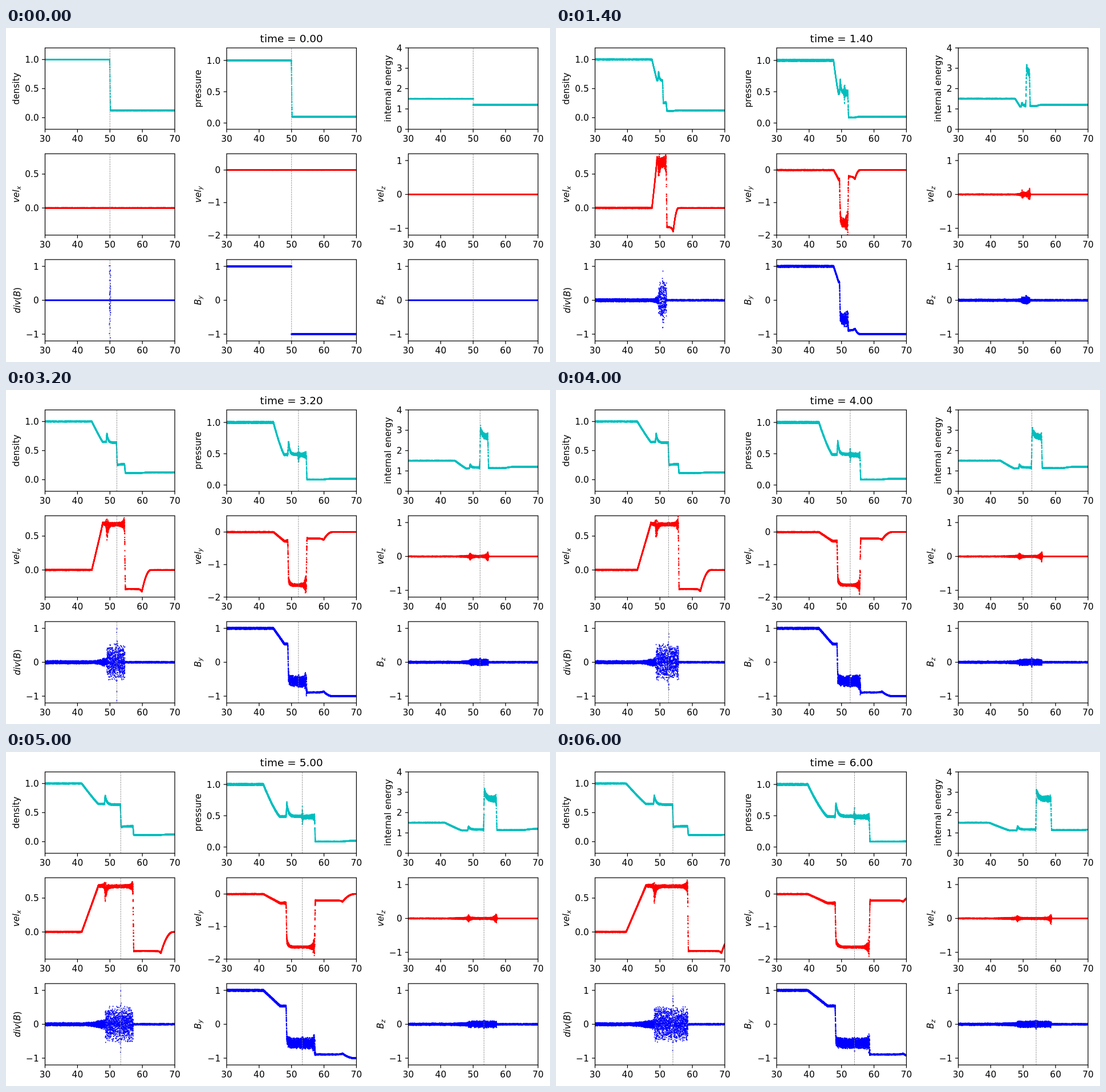
An HTML page with a canvas for the animation above (6.2 s loop, 954 by 587 pixels).

```html
<!DOCTYPE html>
<html lang="en">
<head>
<meta charset="utf-8">
<title>Shock tube</title>
<style>
html, body { margin: 0; width: 100%; height: 100%; overflow: hidden; background: #fff; }
canvas { display: block; }
</style>
</head>
<body>
<canvas id="stage" width="954" height="587"></canvas>
<script>
const ctx = document.getElementById('stage').getContext('2d');
const LOOP = 6200, STEP = 200, SAMPLES = 6000;
const W = 227.5, H = 143, COLS = [68.5, 387, 705.5], ROWS = [35, 221, 407];
const EM = 15.4, FONT = '"DejaVu Sans", Verdana, sans-serif';
const COLORS = ['#00bfbf', '#ff0000', '#0000ff'];

// l, m, p, q, r, f: plateaus from left to right, split by the waves.
// o: overshoot at the fan tail, sa/qa: decaying peaks, dp: dip, bend: fan curvature.
// n*: scatter left, in the fan, middle, behind contact, right, at spike, contact and shock.
const panels = [
  { name: 'density', lo: -0.2, hi: 1.2, ticks: [0, 0.5, 1], dec: 1, base: 23.4,
    l: 1, m: 0.648, p: 0.637, q: 0.265, r: 0.115, f: 0.125, o: -0.012, sa: 0.16, qa: -0.02, bend: 1.08, soft: 1,
    nl: 0.007, nm: 0.014, nq: 0.01, ns: 0.01, nk: 0.01 },
  { name: 'pressure', lo: -0.1, hi: 1.2, ticks: [0, 0.5, 1], dec: 1, base: 23.4,
    l: 1, m: 0.487, p: 0.492, q: 0.48, r: 0.088, f: 0.1, o: -0.022, sa: 0.21, bend: 1.28, soft: 1,
    nl: 0.016, nm: 0.02, nq: 0.035, ns: 0.03, nc: 0.2, nk: 0.04 },
  { name: 'internal energy', lo: 0, hi: 4, ticks: [0, 1, 2, 3, 4], base: 38,
    l: 1.5, m: 1.13, p: 1.17, q: 2.67, r: 1.14, f: 1.2, o: -0.03, sa: 0.14, qa: 0.48, bend: 1.1,
    nl: 0.012, nm: 0.03, nq: 0.15, ns: 0.03, nc: 0.4, nk: 0.12 },
  { name: 'vel', sub: 'x', lo: -0.4, hi: 0.8, ticks: [0, 0.5], dec: 1, base: 23.4,
    l: 0, m: 0.68, p: 0.674, q: 0.674, r: -0.28, f: 0, o: 0.06, sa: -0.1, dp: -0.03,
    nl: 0.006, ng: 0.025, nm: 0.022, ns: 0.18, nk: 0.14, gain: 2 },
  { name: 'vel', sub: 'y', lo: -2, hi: 0.5, ticks: [-2, -1, 0], base: 23.4,
    l: 0, m: -0.28, p: -1.63, q: -1.63, r: -0.2, f: 0, o: -0.02, sa: 0.2, dp: -0.035,
    nl: 0.01, ng: 0.03, nm: 0.03, ns: 0.1, nk: 0.46, gain: 3 },
  { name: 'vel', sub: 'z', lo: -1.2, hi: 1.2, ticks: [-1, 0, 1], base: 25,
    nl: 0.008, ng: 0.035, nm: 0.028, ns: 0.1, nk: 0.18, gain: 0.8 },
  { name: 'div(B)', lo: -1.2, hi: 1.2, ticks: [-1, 0, 1], base: 24.7,
    nl: 0.05, ng: 0.12, nm: 0.55, nc: 0.85, nr: 0.02, burst: 1 },
  { name: 'B', sub: 'y', lo: -1.2, hi: 1.2, ticks: [-1, 0, 1], base: 23.4,
    l: 1, m: 0.54, p: -0.56, q: -0.56, r: -0.89, f: -1, sa: 0.1, dp: 0.025,
    nl: 0.027, nm: 0.17, nc: 0.1, nk: 0.2, nr: 0.01 },
  { name: 'B', sub: 'z', lo: -1.2, hi: 1.2, ticks: [-1, 0, 1], base: 25,
    nl: 0.03, ng: 0.03, nm: 0.1, nc: 0.09, nr: 0.014 }
];
const zero = {};
for (const key of ['l', 'm', 'p', 'q', 'r', 'f', 'o', 'sa', 'qa', 'dp',
  'nl', 'ng', 'nm', 'nr', 'ns', 'nc', 'nk', 'gain', 'dec']) zero[key] = 0;
panels.forEach((p, i) => {
  panels[i] = { bend: 1, ...zero, nq: p.nm, ...p };
});

function rng(seed) {
  return () => {
    seed = (seed + 0x6D2B79F5) | 0;
    let z = Math.imul(seed ^ (seed >>> 15), 1 | seed);
    z = (z + Math.imul(z ^ (z >>> 7), 61 | z)) ^ z;
    return ((z ^ (z >>> 14)) >>> 0) / 4294967296;
  };
}
const mix = (a, b, u) => a + (b - a) * u;
const fade = (dist, len) => Math.exp(-Math.abs(dist) / len);
function rise(x, at, width) {
  const u = Math.min(1, Math.max(0, (x - at) / width + 0.5));
  return u * u * (3 - 2 * u);
}

function waves(t) {
  const grown = 1 - Math.exp(-t / 0.8);
  return {
    t,
    early: Math.min(1.5, Math.exp((1.4 - t) / 1.2)),
    width: 0.05 + 0.27 * Math.min(1, t),
    head: 50 - 1.73 * t - 0.05 * grown,
    tail: 50 - 0.75 * t + 0.2 * grown,
    spike: 50 - 0.293 * t,
    contact: 50 + 0.667 * t,
    shock: 50 + 1.432 * t + 0.05 * grown,
    dip: 50 + 3.25 * t - 0.55 * grown,
    end: 50 + 3.8 * t + 0.5 * grown
  };
}

function value(p, w, x) {
  if (w.t === 0) return mix(p.l, p.f, p.soft ? rise(x, 50.05, 0.3) : +(x > 50));
  let v;
  if (x < w.head) v = p.l;
  else if (x < w.tail) {
    const u = (x - w.head) / (w.tail - w.head);
    v = mix(p.l, p.m, 1 - Math.pow(1 - u, p.bend));
  } else v = p.m;
  if (x > w.head) v += p.o * w.early * fade(x - w.tail, 0.25);
  if (x > w.spike - 1) {
    const peak = p.sa * Math.exp(-Math.max(0, x - w.spike) / (0.15 + 0.07 * w.t));
    v = mix(v, p.p + peak, rise(x, w.spike - 0.1, w.width));
  }
  if (x > w.contact - 1) {
    const peak = p.qa * Math.exp(-Math.max(0, x - w.contact) / 0.6);
    v = mix(v, p.q + peak, rise(x, w.contact, w.width));
  }
  if (x > w.shock - 1) {
    const dp = p.dp * (1 + 1.3 * w.early);
    let right;
    if (x < w.dip) right = p.r + dp * fade(w.dip - x, 0.4);
    else {
      const u = Math.min(1, (x - w.dip) / (w.end - w.dip));
      right = mix(p.f, p.r + dp, (1 - u) * (1 - u));
    }
    v = mix(v, right, rise(x, w.shock, w.width));
  }
  return v;
}

function scatter(p, w, x) {
  if (w.t === 0) return p.burst && Math.abs(x - 50.03) < 0.2 ? 1.25 : 0;
  let n;
  if (x < w.spike) {
    const u = Math.max(0, (x - w.head) / (w.spike - w.head));
    n = p.nl + p.ng * u * u;
  } else if (x < w.shock) {
    n = (x < w.contact ? p.nm : p.nq) * (1 + p.gain * Math.exp((1.4 - w.t) / 0.8));
  } else n = p.nr;
  n += p.ns * fade(x - w.spike, x < w.spike ? 0.15 : 0.4);
  n += p.nc * fade(x - w.contact, 0.08 + 0.25 * Math.exp(-w.t));
  n += p.nk * fade(x - w.shock, x < w.shock ? 0.5 : 0.08);
  return n;
}

function text(str, x, y, align, size = EM) {
  ctx.font = size + 'px ' + FONT;
  ctx.textAlign = align;
  ctx.fillText(str, x, y);
}

function axisName(p, left, top) {
  const runs = [];
  if (p.sub) {
    runs.push([p.name, 'italic ', EM, 0], [p.sub, 'italic ', EM * 0.7, 2.5]);
  } else if (p.burst) {
    for (const ch of p.name) runs.push([ch, /\w/.test(ch) ? 'italic ' : '', EM, 0]);
  } else runs.push([p.name, '', EM, 0]);
  ctx.save();
  ctx.translate(left - 68.5 + p.base, top + H / 2);
  ctx.rotate(-Math.PI / 2);
  ctx.textAlign = 'left';
  const setFont = r => { ctx.font = r[1] + r[2] + 'px ' + FONT; };
  const widths = runs.map(r => { setFont(r); return ctx.measureText(r[0]).width; });
  let x = -widths.reduce((a, b) => a + b) / 2;
  runs.forEach((r, i) => {
    setFont(r);
    ctx.fillText(r[0], x, r[3]);
    x += widths[i];
  });
  ctx.restore();
}

function line(x1, y1, x2, y2) {
  ctx.beginPath();
  ctx.moveTo(x1, y1);
  ctx.lineTo(x2, y2);
  ctx.stroke();
}

function drawPanel(p, i, w, step) {
  const left = COLS[i % 3], row = Math.floor(i / 3), top = ROWS[row];
  const px = x => left + (x - 30) / 40 * W;
  const py = v => top + (p.hi - v) / (p.hi - p.lo) * H;
  const rand = rng(step * 97 + i * 1013 + 5);

  ctx.save();
  ctx.beginPath();
  ctx.rect(left, top, W, H);
  ctx.clip();
  ctx.fillStyle = COLORS[row];
  const dot = p.burst ? 1.7 : 2.1;
  for (let k = 0; k < SAMPLES; k++) {
    const x = 30 + 40 * (k + rand()) / SAMPLES;
    const v = value(p, w, x) + scatter(p, w, x) * (rand() + rand() - 1);
    const y = py(v) + (rand() - 0.5) * 0.8;
    ctx.fillRect(px(x) - dot / 2, y - dot / 2, dot, dot);
  }
  if (w.t === 0 || w.t > 1.5) {
    ctx.strokeStyle = '#808080';
    ctx.lineWidth = 0.8;
    ctx.setLineDash([2.85, 1.25]);
    line(px(w.contact), top + H, px(w.contact), top);
  }
  ctx.restore();

  ctx.strokeStyle = ctx.fillStyle = '#000';
  ctx.lineWidth = 1.23;
  ctx.strokeRect(left, top, W, H);
  for (let x = 30; x <= 70; x += 10) {
    line(px(x), top + H, px(x), top + H + 5.4);
    text(x, px(x), top + H + 22, 'center');
  }
  for (const v of p.ticks) {
    line(left - 5.4, py(v), left, py(v));
    text(v.toFixed(p.dec).replace('-', '\u2212'), left - 10.8, py(v) + 5.6, 'right');
  }
  axisName(p, left, top);
}

function draw(step) {
  const t = step * STEP / 1000, w = waves(t);
  ctx.fillStyle = '#fff';
  ctx.fillRect(0, 0, 954, 587);
  panels.forEach((p, i) => drawPanel(p, i, w, step));
  text('time = ' + t.toFixed(2), COLS[1] + W / 2, 25.3, 'center', 18.5);
}

let shown = -1;
const start = performance.now();
function tick() {
  const step = Math.floor(((performance.now() - start) % LOOP) / STEP);
  if (step !== shown) draw(shown = step);
  requestAnimationFrame(tick);
}
tick();
</script>
</body>
</html>
```
